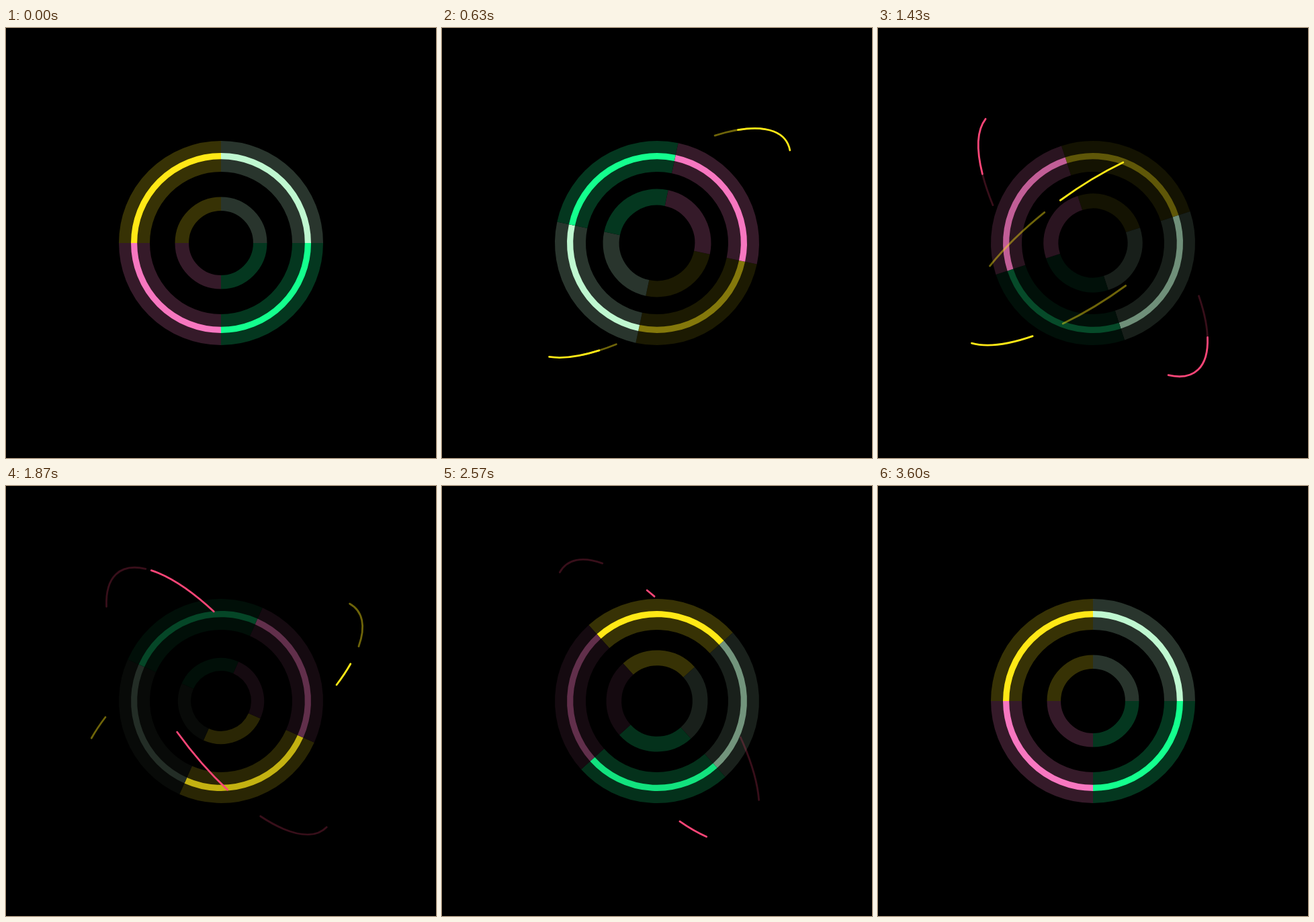
Write an HTML page with a canvas that moves like this. It is 640x640 px and loops after 3630 ms.

```html
<!DOCTYPE html>
<html lang="en">
<head>
<meta charset="utf-8">
<title>Orbit loader</title>
<style>
  html, body { margin: 0; width: 100%; height: 100%; overflow: hidden; background: #000; }
  canvas { display: block; }
</style>
</head>
<body>
<canvas id="stage" width="640" height="640"></canvas>
<script>
const ctx = document.getElementById('stage').getContext('2d');
const { PI, sin, cos, abs, min, max } = Math;
const RAD = PI / 180;
const LOOP = 3630;
const STEPS = 90;
const ORBIT_LENGTH = 850;

// Quarter segments, clockwise from the left: colour and second of the deepest fade
const segments = [
  { color: [255, 232, 22], fadeAt: 1.12 },
  { color: [191, 247, 208], fadeAt: 1.99 },
  { color: [20, 255, 142], fadeAt: 1.67 },
  { color: [247, 119, 192], fadeAt: 2.22 },
];

// Each pair flies on opposite sides; turn is in degrees, the rest in steps
const pairs = [
  { color: '#ffe816', ghost: 0.43, ghostLag: 4, turn: -36, delay: 0 },
  { color: '#ff4678', ghost: 0.22, ghostLag: 7, turn: 54, delay: 18 },
];

const shade = (color, k) => `rgb(${color.map(v => Math.round(v * k)).join()})`;

function pulseRadius(n) {
  const a = 2 * PI * n / STEPS;
  return 73.7 + 3.8 * cos(a - 1.05) - 7.3 * cos(2 * a - 0.24);
}

// Progress along the orbit: a late start, a rush across the front, a soft landing
function flight(x, lateness) {
  const a = PI * min(x, 1);
  return max(0, a / PI - lateness * sin(a)
    - 0.055 * sin(2 * a) + 0.042 * sin(3 * a) - 0.024 * sin(4 * a));
}

function band(start, radius, width, style) {
  ctx.beginPath();
  ctx.arc(0, 0, radius, start, start + PI / 2);
  ctx.lineWidth = width;
  ctx.strokeStyle = style;
  ctx.stroke();
}

function streak(step, alpha) {
  if (step <= 0 || step >= 47) return;
  const head = ORBIT_LENGTH * flight(step / 46, 0.142);
  const tail = ORBIT_LENGTH * flight(step / 47, 0.26);
  ctx.globalAlpha = alpha;
  ctx.setLineDash([max(0, head - tail), 2 * ORBIT_LENGTH]);
  ctx.lineDashOffset = -tail;
  ctx.beginPath();
  ctx.ellipse(0.6, -11, 244.2, 91, 0, -58.5 * RAD, 238.5 * RAD);
  ctx.stroke();
}

function drawRings(n) {
  const inner = pulseRadius(n);
  segments.forEach(({ color, fadeAt }, i) => {
    const start = (180 + 90 * i + 12 * n) * RAD;
    const light = min(1, 0.085 + 0.9 * abs(n / 25 - fadeAt));
    const dim = shade(color, 0.215 * light);
    band(start, 129, 46, dim);
    band(start, inner * 0.85, inner * 0.3, dim);
    band(start, 129.4, 9.2, shade(color, light));
  });
}

function drawComets(n) {
  for (const { color, ghost, ghostLag, turn, delay } of pairs) {
    for (const side of [0, 1]) {
      // The rose pair launches from the far side first
      const step = n - delay - 4 * side;
      ctx.save();
      ctx.rotate((turn + 180 * side) * RAD);
      ctx.lineCap = 'round';
      ctx.lineWidth = 2.8;
      ctx.strokeStyle = color;
      streak(step - ghostLag, ghost);
      streak(step, 1);
      ctx.restore();
    }
  }
}

function draw() {
  // Motion runs at 25 steps per second, shown on a 30 Hz clock
  const tick = Math.floor((performance.now() % LOOP + 3.4) * 0.03);
  const n = min(STEPS, Math.ceil(tick * 5 / 6 - 0.5));
  ctx.setTransform(1, 0, 0, 1, 0, 0);
  ctx.fillStyle = '#000';
  ctx.fillRect(0, 0, 640, 640);
  ctx.translate(320, 320);
  drawRings(n);
  drawComets(n);
  requestAnimationFrame(draw);
}
draw();
</script>
</body>
</html>
```
